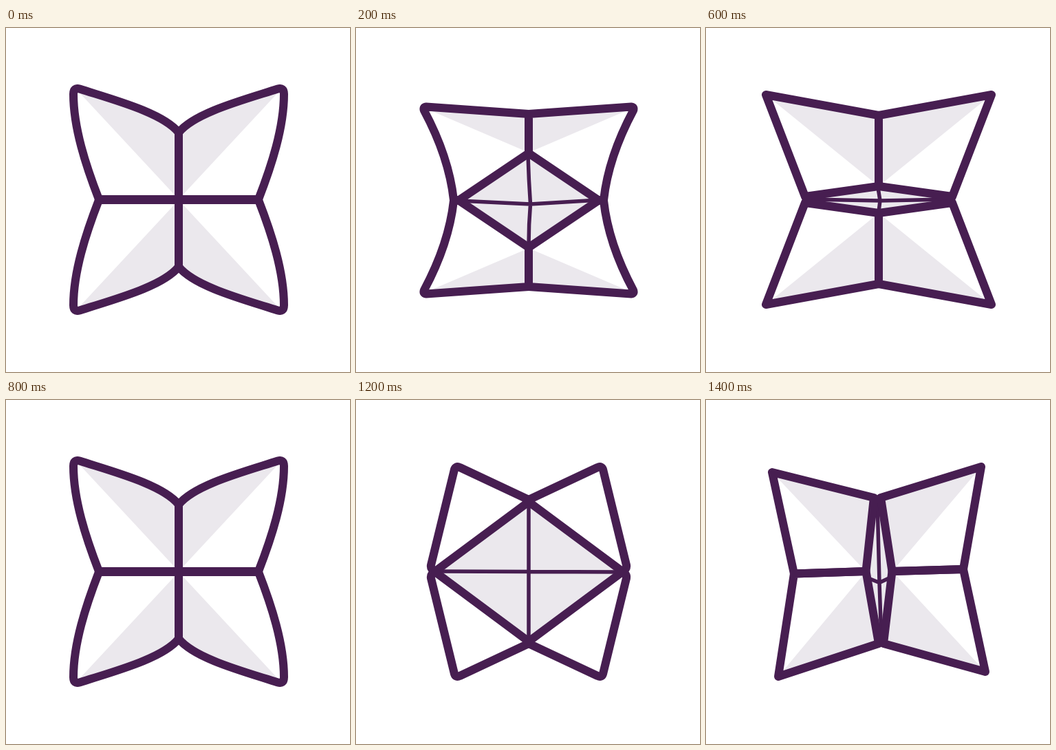
Animation of 500 by 500 pixels, one loop 1600 ms. Source, as an HTML page:

```html
<!DOCTYPE html>
<html lang="en">
<head>
<meta charset="utf-8">
<title>Paper fortune teller</title>
<style>
  html, body { margin: 0; width: 100%; height: 100%; overflow: hidden; background: #fff; }
  svg { display: block; width: 100%; height: 100%; }
  .ink, .thin { fill: none; stroke: #471e51; stroke-width: 12; stroke-linejoin: round; stroke-linecap: round; }
  .thin { stroke-width: 5.5; }
  .solid { fill: #471e51; }
  .shade { fill: #ebe8ed; }

  /* Each pose holds for 200 ms, its slot set by --n */
  .pose { opacity: 0; animation: show 1600ms step-end calc(var(--n) * 200ms - 1600ms) infinite; }
  .rest { animation: rest 800ms step-end infinite; }
  @keyframes show { 0% { opacity: 1; } 12.5%, 100% { opacity: 0; } }
  @keyframes rest { 0% { opacity: 1; } 25%, 100% { opacity: 0; } }

  /* Mirrors; --mid is the height of the horizontal axis */
  .flip-x { transform: matrix(-1, 0, 0, 1, 502, 0); }
  .flip-y { transform: translateY(calc(var(--mid, 249.5) * 2px)) scaleY(-1); }
</style>
</head>
<body>
<svg viewBox="0 0 500 500">

  <!-- closed -->
  <g class="pose rest">
    <g id="closed">
      <g id="closed-flap">
        <path class="shade" d="M251 249V152C228 123 155 104 104 91Z"/>
        <path class="ink" d="M251 249V152C228 123 155 104 107 88.5Q98 86 98 96C98 145 116 200 135 249Z"/>
      </g>
      <use href="#closed-flap" class="flip-x"/>
    </g>
    <use href="#closed" class="flip-y"/>
  </g>

  <!-- opening upward and downward -->
  <g class="pose" style="--n:1; --mid:250.5">
    <path class="shade" d="M251 182L353 250L251 318L149 250Z"/>
    <path class="thin" d="M250 185Q251 220 253.5 256Q251 285 251 316M149 251L253.5 256L353 250"/>
    <g id="half">
      <g id="half-flap">
        <path class="shade" d="M99 116L251 125V181Z"/>
        <path class="ink" d="M251 182V125L102 114.5Q97 115 99 120C122 163 137 205 142 250H150Z"/>
      </g>
      <use href="#half-flap" class="flip-x"/>
    </g>
    <use href="#half" class="flip-y"/>
  </g>

  <!-- fully open, tall -->
  <g class="pose" style="--n:2; --mid:248.5">
    <path class="shade" d="M251 112L350 248L251 385L152 248Z"/>
    <path class="thin" d="M249 114L252 385M154 247.2H348"/>
    <g id="tall">
      <path id="tall-flap" class="ink" d="M99 146Q97 140.5 103 139L241 106Q248 104.5 251 112L152 248H147Z"/>
      <use href="#tall-flap" class="flip-x"/>
    </g>
    <use href="#tall" class="flip-y"/>
  </g>

  <!-- closing from tall -->
  <g class="pose" style="--n:3">
    <path class="shade" d="M251 230L358 249L251 269L144 249Z"/>
    <path class="thin" d="M146 249L253 251L356 249M250 232L253 251L251 267"/>
    <g id="slit">
      <g id="slit-flap">
        <path class="shade" d="M87 97L251 127V230Z"/>
        <path class="ink" d="M87 97L251 127V230L144 245Z"/>
      </g>
      <use href="#slit-flap" class="flip-x"/>
    </g>
    <use href="#slit" class="flip-y"/>
  </g>

  <!-- opening sideways -->
  <g class="pose" style="--n:5">
    <path class="shade" d="M253 142L355 252L255 356L154 257Z"/>
    <path class="thin" d="M254 148L258 267L254 350M155 258L257 267.5L355 256"/>
    <path class="solid" d="M122 254L155 248L162 256L154 262L122 257ZM385 253L353 247L345 255L355 262L385 257Z"/>
    <path class="shade" d="M112 84L253 141L154 246ZM389 82L253 141L353 245ZM123 400V424L254 356L154 262ZM386 385L389 421L254 356L355 262Z"/>
    <path class="ink" d="M109.5 87Q109 77.5 117 81L253 141L155 248L122 253.5Z"/>
    <path class="ink" d="M253 141L385 78Q393 75 392.5 84L385 252.5L353 247Z"/>
    <path class="ink" d="M122.5 257L122.5 419Q123 426 130 422L254 356L154 261.5Z"/>
    <path class="ink" d="M254 356L383 419.5Q390 422.5 389.5 415L385 257.5L355 262Z"/>
  </g>

  <!-- fully open, wide -->
  <g class="pose" style="--n:6">
    <path class="shade" d="M251 148L388 249L251 351L114 249Z"/>
    <path class="thin" d="M251 150V349M117 249L385 250"/>
    <g id="wide">
      <path id="wide-flap" class="ink" d="M143 101Q145 95 151 98L251 145V148L115 249Q108 246 109 240Z"/>
      <use href="#wide-flap" class="flip-x"/>
    </g>
    <use href="#wide" class="flip-y"/>
  </g>

  <!-- closing from wide -->
  <g class="pose" style="--n:7">
    <path class="shade" d="M249 142L271 249L255 354L232 249Z"/>
    <path class="thin" d="M249 145L252 265L255 352M236 259L252 265.5L268 258"/>
    <path class="shade" d="M96 105L244 142L232 249ZM400 97L254 142L271 249ZM105 402L251 354L232 250ZM406 395L258 354L271 249Z"/>
    <path class="ink" d="M96 105L244 142L232.5 249L128 252.5Z"/>
    <path class="ink" d="M400 97L254 142L270.5 249L374 246Z"/>
    <path class="ink" d="M105 402L251 354L232.5 249L128 252.5Z"/>
    <path class="ink" d="M406 395L258 354L270.5 249L374 246Z"/>
  </g>
</svg>
</body>
</html>
```
